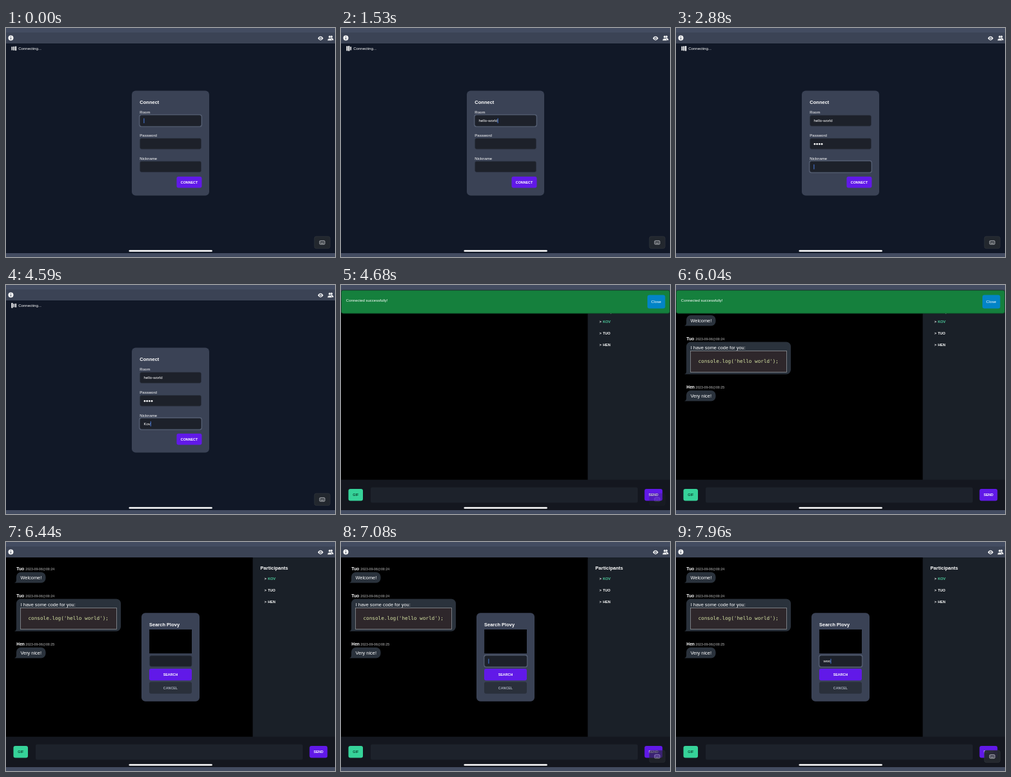
These frames come from a looping animation (510 px wide and 356 px high, 8 s). An HTML page:

```html
<!DOCTYPE html>
<html lang="en">
<head>
<meta charset="utf-8">
<title>Chat room</title>
<style>
  html, body { margin: 0; width: 100%; height: 100%; overflow: hidden; background: #111827; }
  svg { display: block; width: 510px; height: 356px; }
  text { font-family: "Liberation Sans", Arial, sans-serif; font-size: 6.05px; fill: #fff; white-space: pre; }
  .title { font-size: 7.5px; font-weight: 700; }
  .btn { font-size: 5.35px; font-weight: 700; text-anchor: middle; }
  .user { font-size: 5.5px; font-weight: 700; }
  .name { font-size: 6.7px; font-weight: 700; }
  .stamp { font-size: 5.2px; font-weight: 700; fill: #858585; }
  .msg { font-size: 7.4px; }
  .code { font-family: "DejaVu Sans Mono", monospace; font-size: 7.66px; fill: #d6e3a3; }
</style>
</head>
<body>
<svg id="stage" viewBox="0 0 510 356"></svg>
<script>
const LOOP = 8000;
const CONNECTED = 4680, HISTORY = 5160, DISMISSED = 6120, SEARCH = 6440, SEARCH_FOCUS = 6920;

const rect = (x, y, w, h, fill, r = 0, extra = '') =>
  `<rect x="${x}" y="${y}" width="${w}" height="${h}" rx="${r}" fill="${fill}" ${extra}/>`;
const text = (x, y, str, cls = '', extra = '') =>
  `<text x="${x}" y="${y}" class="${cls}" ${extra}>${str}</text>`;
const group = (id, body) => `<g id="${id}">${body}</g>`;
const button = (x, y, w, h, fill, label, color = '#fff') =>
  rect(x, y, w, h, fill, 3) + text(x + w / 2, y + h / 2 + 1.9, label, 'btn', `style="fill:${color}"`);

// Input box with focus ring, typed value and caret
const field = (id, x, y, w) => group(id,
  rect(x - .8, y - .8, w + 1.6, 18.3, 'none', 3, 'class="ring" stroke="#596377" stroke-width="1.3"') +
  rect(x, y, w, 16.7, '#1d212a', 2.4, 'stroke="#2c3341" stroke-width=".6"') +
  text(x + 5.7, y + 10.5, '', 'value') +
  '<g class="dots" fill="#fff"></g>' +
  rect(x + 5.7, y + 4.6, 1, 7.8, '#4a7de0', .4, 'class="caret"'));

const bubble = (y, w, h) =>
  `<path fill="#2a323c" d="M23 ${y}h${w - 14}a7 7 0 0 1 7 7v${h - 14}a7 7 0 0 1 -7 7H13q3 -1 3 -4.5V${y + 7}a7 7 0 0 1 7 -7z"/>`;
const head = (y, name, time) =>
  text(16.3, y, name, 'name') + text(30.3, y, `2023-09-06@${time}`, 'stamp');

const person = (x, y, s) =>
  `<circle cx="${x}" cy="${y - 2 * s}" r="${2 * s}"/><path d="M${x - 3.5 * s} ${y + 4 * s}q0 -3.6 ${3.5 * s} -3.6t${3.5 * s} 3.6z"/>`;

const header = rect(0, 7, 510, 17, '#3b4355') +
  `<circle cx="7.5" cy="15.5" r="4" fill="#fff"/>` +
  rect(7, 14.9, 1.1, 3, '#3b4355') + rect(7, 12.9, 1.1, 1.2, '#3b4355') +
  `<path fill="#fff" d="M483.3 16q4.3 -6.4 8.6 0q-4.3 6.4 -8.6 0z"/>
   <circle cx="487.6" cy="16" r="1.9" fill="#3b4355"/><circle cx="487.6" cy="16" r="1" fill="#fff"/>
   <g fill="#fff">${person(504.4, 15.4, .9)}</g>
   <g fill="#fff" stroke="#3b4355" stroke-width=".6">${person(501.8, 15.7, 1)}</g>`;

const login = group('login',
  group('spinner', [8.36, 11.22, 14.08].map(x => rect(x, 28, 2.1, 7, '#fff')).join('')) +
  text(19.2, 34.1, 'Connecting...') +
  rect(195, 97.5, 120, 163, '#3a4255', 6) +
  text(207.3, 117.6, 'Connect', 'title') +
  text(207.3, 133, 'Room') + field('room', 207.7, 135.7, 94.8) +
  text(207.3, 168.9, 'Password') + field('pass', 207.7, 171.5, 94.8) +
  text(207.3, 204.8, 'Nickname') + field('nick', 207.7, 207.3, 94.8) +
  button(264.5, 231, 39, 17.5, '#6119e8', 'CONNECT'));

const member = (y, name, color) =>
  text(400.5, y, '&gt;', 'user') + text(406, y, name, 'user', `style="fill:${color}"`);

const chat = group('chat',
  rect(0, 24, 383, 279, '#000') + rect(382.5, 24, 127.5, 279, '#1a2028') +
  text(394.3, 42.6, 'Participants', 'title') +
  member(59.3, 'KOV', '#4fcf9f') + member(77.2, 'TUO', '#fff') + member(95.2, 'HEN', '#fff') +
  group('history',
    head(44, 'Tuo', '00:24') + bubble(47, 45.5, 16.5) + text(22.5, 57.8, 'Welcome!', 'msg') +
    head(86, 'Tuo', '00:24') + bubble(88.5, 162, 50.2) +
    text(22.7, 99.7, 'I have some code for you:', 'msg') +
    rect(22.5, 102.5, 149, 33, '#2e272b', 0, 'stroke="#8d9196" stroke-width=".8"') +
    text(34.5, 120.8, "console.log('hello world');", 'code') +
    head(161.3, 'Hen', '00:25') + bubble(164, 45.5, 16.5) + text(22.5, 174.9, 'Very nice!', 'msg')) +
  rect(0, 302.7, 510, 47.3, '#14171f') +
  button(11.5, 317, 22.5, 18.5, '#36d399', 'GIF', '#0c4a36') +
  rect(46, 314.5, 414, 24, '#1d222b', 2.5) +
  button(470.5, 317, 27.8, 18.5, '#6119e8', 'SEND'));

const banner = group('banner',
  rect(.4, 8.2, 509.2, 36, '#15803d', 3, 'stroke="#0e3f24" stroke-width=".8"') +
  text(7.8, 25.6, 'Connected successfully!', '', 'style="font-size:6px"') +
  rect(475, 15.5, 27.5, 21, '#0284c7', 3) +
  text(488.6, 28.4, 'Close', '', 'text-anchor="middle"'));

const search = group('search',
  rect(210, 110.3, 90, 137.5, '#3a4255', 6) +
  text(222, 130.5, 'Search Plovy', 'title') +
  rect(222.2, 136, 65.8, 37.2, '#000') +
  field('query', 222.7, 176.8, 65.3) +
  button(222, 197, 66, 18.2, '#6119e8', 'SEARCH') +
  button(222, 217.5, 66, 18.3, '#2a303b', 'CANCEL', '#a6adbb'));

const keyRow = (y, n) => Array.from({ length: n }, (_, i) => rect(487.2 + i * 1.6, y, .8, .8, '#d8dade')).join('');
const keyboard = group('keyboard',
  rect(478, 324, 24.3, 18.7, '#24282e', 3, 'stroke="#343941" stroke-width=".6" fill-opacity=".95"') +
  rect(486.2, 330.7, 7.9, 5.6, 'none', 1, 'stroke="#d8dade" stroke-width=".8"') +
  keyRow(332, 4) + rect(487.6, 334.1, 5, .8, '#d8dade'));

const stage = document.getElementById('stage');
stage.innerHTML = rect(0, 0, 510, 356, '#111827') + header + login + chat + banner + search +
  rect(0, 0, 510, 7, '#434c61') + rect(0, 350, 510, 6, '#434c61') +
  rect(190.5, 345.2, 129.3, 2.6, '#fff', 1.3) + keyboard;

const $ = id => document.getElementById(id);
const show = (id, on) => { $(id).style.display = on ? '' : 'none'; };
const clamp = v => Math.max(0, Math.min(1, v));

// focus and blur times, then when each character lands
const steps = (start, gap, n) => Array.from({ length: n }, (_, i) => start + i * gap);
const inputs = [
  { id: 'room', value: 'hello-world', focus: 0, blur: 1620, keys: steps(360, 90, 11) },
  { id: 'pass', value: '****', focus: 1620, blur: 2700, keys: steps(1890, 180, 4), secret: true },
  { id: 'nick', value: 'Kov', focus: 2700, blur: CONNECTED, keys: steps(3330, 180, 3) },
  { id: 'query', value: 'woo', focus: SEARCH_FOCUS, blur: LOOP, keys: steps(7640, 120, 3) },
];

function drawInput({ id, value, focus, blur, keys, secret }, t) {
  const box = $(id), part = name => box.querySelector('.' + name);
  const label = part('value'), caret = part('caret');
  const count = keys.filter(k => k <= t).length;
  const x = +label.getAttribute('x'), y = +label.getAttribute('y');
  let width;
  if (secret) {
    part('dots').innerHTML = steps(x + 1.6, 3.7, count)
      .map(cx => `<circle cx="${cx}" cy="${y - 1.6}" r="1.4"/>`).join('');
    width = count * 3.7;
  } else {
    label.textContent = value.slice(0, count);
    width = count ? label.getComputedTextLength() : 0;
  }
  const active = t >= focus && t < blur;
  part('ring').style.display = caret.style.display = active ? '' : 'none';
  caret.setAttribute('x', x + width);
}

function drawSpinner(t) {
  const phase = (t - 4590) / 1080 + 6.03;
  [...$('spinner').children].forEach((pillar, i) => {
    const p = (phase - i * .1875) % 1;
    const shrink = p < .9375 ? p / .9375 : (1 - p) / .0625;
    const h = 7.9 - 2.9 * shrink;
    pillar.setAttribute('y', 31.8 - h / 2);
    pillar.setAttribute('height', h);
    pillar.setAttribute('opacity', 1 - .25 * shrink);
  });
}

function keyboardOpacity(t) {
  if (t >= SEARCH_FOCUS) return clamp((t - SEARCH_FOCUS) / 240);
  if (t >= CONNECTED) return .25 * clamp(1 - (t - CONNECTED) / 200);
  const switching = [1620, 2700].some(s => t >= s && t < s + 90);
  return switching ? .5 : 1;
}

function draw(t) {
  show('login', t < CONNECTED);
  show('chat', t >= CONNECTED);
  show('history', t >= HISTORY);
  show('banner', t >= CONNECTED && t < DISMISSED);
  show('search', t >= SEARCH);
  inputs.forEach(input => drawInput(input, t));
  drawSpinner(t);
  $('keyboard').setAttribute('opacity', keyboardOpacity(t));
}

const start = performance.now();
function tick() {
  draw((performance.now() - start) % LOOP);
  requestAnimationFrame(tick);
}
tick();
</script>
</body>
</html>
```
